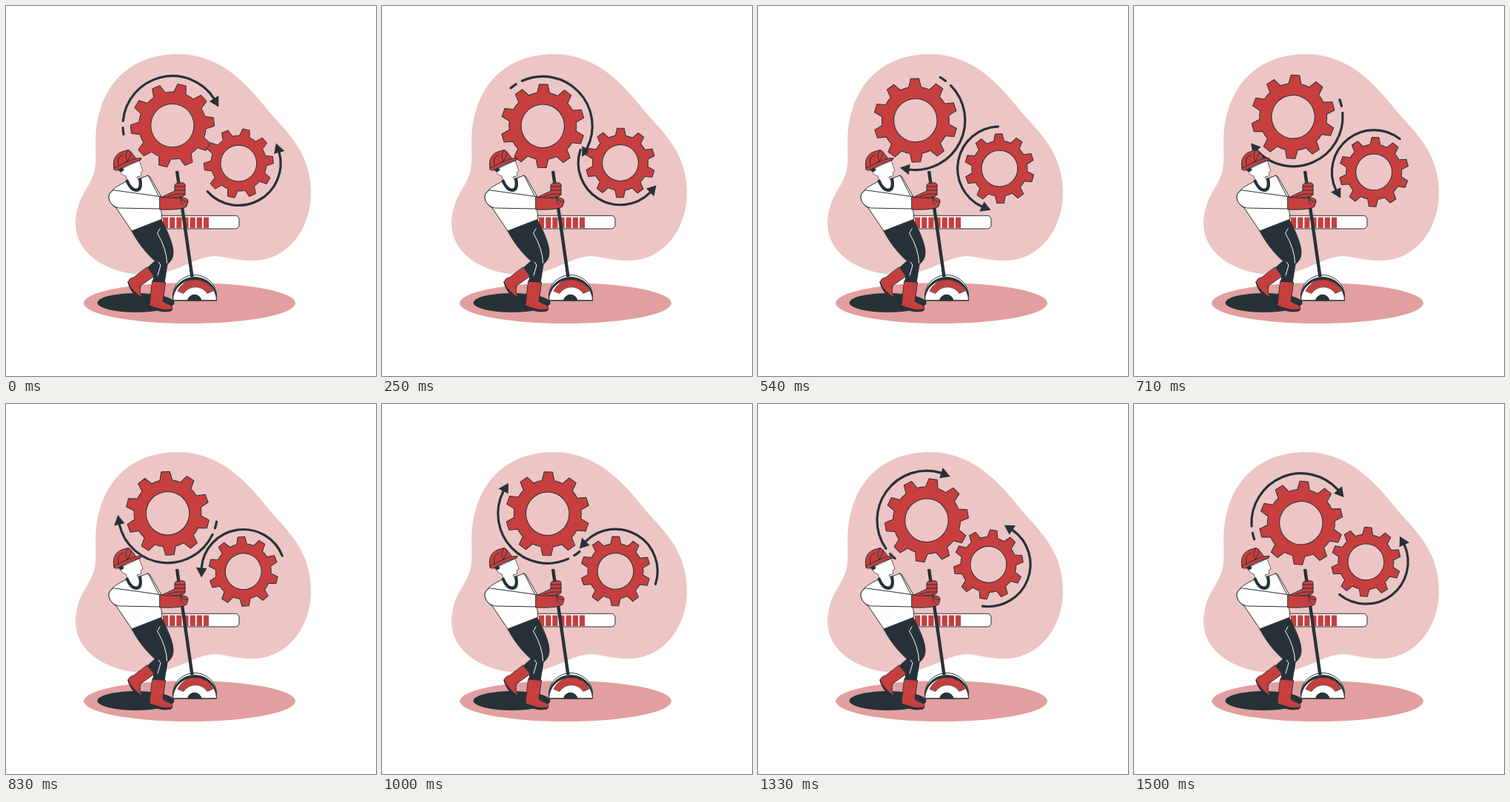
Animation, 500 px wide and 500 px high, one loop 1.54 s. Source, as an HTML page:

```html
<!DOCTYPE html>
<html lang="en">
<head>
<meta charset="utf-8">
<style>
  html, body { margin: 0; height: 100%; overflow: hidden; background: #fff; }
  svg { display: block; width: 100vw; height: 100vh; }
  .red { fill: #c63f3e; }
  .dark { fill: #263238; }
  .white { fill: #fff; }
  .line { stroke: #263238; stroke-width: 1; stroke-linejoin: round; stroke-linecap: round; }
  .none { fill: none; }
  .arc { fill: none; stroke: #263238; stroke-width: 3.2; stroke-linecap: round; }
</style>
</head>
<body>
<svg viewBox="0 0 500 500">
  <path fill="#edc5c5" d="M232 65C168 65 121 107 121 187C121 207 124 222 111 243C99 261 94 277 94 294C94 338 143 363 188 363C232 363 250 340 282 338C296 338 306 344 334 344C378 344 412 304 412 253C412 201 384 175 362 150C335 119 299 65 232 65Z"/>
  <ellipse cx="248" cy="401.5" rx="143" ry="27.5" fill="#e29f9f"/>
  <ellipse class="dark" cx="175.5" cy="401" rx="52" ry="13"/>

  <g id="gears"></g>

  <!-- progress bar -->
  <rect class="white line" x="195" y="283.3" width="120" height="17.7" rx="5"/>
  <path stroke="#c63f3e" stroke-width="14.5" stroke-dasharray="7.2 1.95" d="M212 292.8H274.1"/>

  <!-- lever -->
  <g class="line">
    <path class="white" d="M225.500 397.500V392A29.500 28.500 0 0 1 284.500 392V397.500Z"/>
    <path class="dark" d="M225.500 397.500V394A29.500 27.500 0 0 1 284.500 394V397.500Z"/>
    <path class="white" d="M225.500 397.500A29.500 28 0 0 1 284.500 397.500Z"/>
    <path class="red" stroke-width=".6" d="M232 385A26.500 26.500 0 0 1 280 385L272 388.500A19 19 0 0 0 240 388.500Z"/>
    <path class="dark" d="M245.500 397.500A9.500 9.500 0 0 1 264 397.500Z"/>
  </g>
  <path d="M231 223L251.500 366" stroke="#263238" stroke-width="4.400"/>

  <!-- legs and boots -->
  <g class="line">
    <path class="dark" d="M203 343L191 354L199 367L212 356Z"/>
    <path class="dark" d="M170 304L210 289C216 300 226 320 226 333C226 341 222 346 218 349L214 374L198 374L204 347C190 335 178 320 170 304Z"/>
    <path class="red" d="M191 353L200 365L182 378Q179 387 185 394L181 396Q168 386 165 374Q166 368 172 367Z"/>
    <path class="dark" d="M165 373Q170 386 184 394L181 396Q168 387 165 373Z"/>
    <path class="red" d="M198 372L215.500 373.500L212 399Q216 402 222 404Q226 406 224.500 410Q217 412 209 410Q203 408 194 405Z"/>
    <path class="dark" d="M194 405Q203 408 209 410Q217 412 224.500 410L223 412Q214 414 207 412L194 407Z"/>
    <path class="none" style="stroke:#fff" d="M208 301L204.500 307Q217 328 217.500 347M206 346L209 350L205 364"/>
  </g>

  <!-- far arm and upper glove -->
  <g class="line">
    <path class="white" d="M191 229L194 230L210 258L208 276L196 270Z"/>
    <path class="red" d="M209 259Q219 254 228 250V242Q229 239 235 239Q242 238 242 242V254Q242 258 235 258L219 260Z"/>
    <path class="none" d="M228 244H242M228 249H242M230 254H242M219 257L230 254"/>
  </g>

  <!-- torso and head -->
  <g class="line">
    <path class="white" d="M163 237C150 243 139 250 139 258Q139 267 149 273L170 304L211 288L208 260L192 229L181 233Z"/>
    <path class="white" style="stroke-width:.7" d="M154 221L180 209L185 223L182 225L183 229Q180 231 177 231L180 237Q181 248 174 247Q167 243 164 236L162 230Q155 228 154 221Z"/>
    <path class="dark" d="M151 220L157 218L159 222L155 224Z"/>
    <path class="none" style="stroke-width:4;stroke-linecap:butt" d="M163 235Q169 250 177 249Q184 248 181 233"/>
    <path class="white" d="M145 249Q138 253 139 260Q141 270 152 273L209 274V258Z"/>
    <path class="red" d="M208 258L235 260Q246 258 246 264L244 271Q238 276 208 275Z"/>
    <path class="none" d="M237 261Q243 266 245 264M237 261Q235 266 239 268"/>
    <path class="red" d="M146 221C143 207 149 199 158 196.500L165 194.500Q169 196 170 199Q174 202 175 206L183 205.500L182 208Q165 213 151 222Z"/>
    <path class="none" d="M146 219Q160 211 175 206M152 216Q149 204 158 201M164 210Q159 201 165 195M164 210Q168 205 169 198"/>
  </g>
</svg>

<script>
const LOOP = 1540, FPS = 24, TEETH = 10;

const polar = (r, deg) => {
  const a = deg * Math.PI / 180;
  return `${(r * Math.cos(a)).toFixed(2)} ${(r * Math.sin(a)).toFixed(2)}`;
};
const arc = (r, from, to) =>
  `M${polar(r, from)}A${r} ${r} 0 0 ${to > from ? 1 : 0} ${polar(r, to)}`;

function gearPath(outer, root, hole, phase) {
  let d = "";
  for (let i = 0; i < TEETH; i++) {
    const a = phase - 90 + i * 360 / TEETH;
    d += `${i ? `A${root} ${root} 0 0 1 ` : "M"}${polar(root, a - 10.6)}` +
      `L${polar(outer, a - 5.8)}L${polar(outer, a + 5.8)}L${polar(root, a + 10.6)}`;
  }
  d += `A${root} ${root} 0 0 1 ${polar(root, phase - 100.6)}Z`;
  return d + `M${hole} 0A${hole} ${hole} 0 1 0 ${-hole} 0A${hole} ${hole} 0 1 0 ${hole} 0Z`;
}

// Each gear sits off its pivot, so it wobbles as it turns.
const gears = [
  { pivot: "220.5 155.2", at: "224.9 161.5", size: [56.6, 45.5, 29.2], phase: 13,
    r: 67, arcs: [[169.8, 177.4], [185.3, 327]], tip: 327, dir: 1 },
  { pivot: "318.8 218.9", at: "314.4 212.6", size: [47, 37.5, 24.4], phase: 12.5,
    r: 56.8, arcs: [[138, -15]], tip: -15, dir: -1 }
];

const layer = document.getElementById("gears");
layer.innerHTML = gears.map(g => `<g><g transform="translate(${g.at})">
  <path class="red line" fill-rule="evenodd" d="${gearPath(...g.size, g.phase)}"/>
  <path class="arc" d="${g.arcs.map(([from, to]) => arc(g.r, from, to)).join("")}"/>
  <path class="dark" transform="rotate(${g.tip}) translate(${g.r} 0)"
    d="M-7.4 0H7.4L-1 ${13 * g.dir}Z"/>
</g></g>`).join("");

function draw(now) {
  const step = Math.min(36, Math.floor((now % LOOP + 4) * FPS / 1000));
  // Ten degrees per step, easing off slightly before the loop closes.
  const angle = Math.min(step * 10, 320 + (step - 32) * 7.75);
  gears.forEach((g, i) =>
    layer.children[i].setAttribute("transform", `rotate(${angle} ${g.pivot})`));
}

const start = performance.now();
function tick() {
  draw(performance.now() - start);
  requestAnimationFrame(tick);
}
tick();
</script>
</body>
</html>
```
